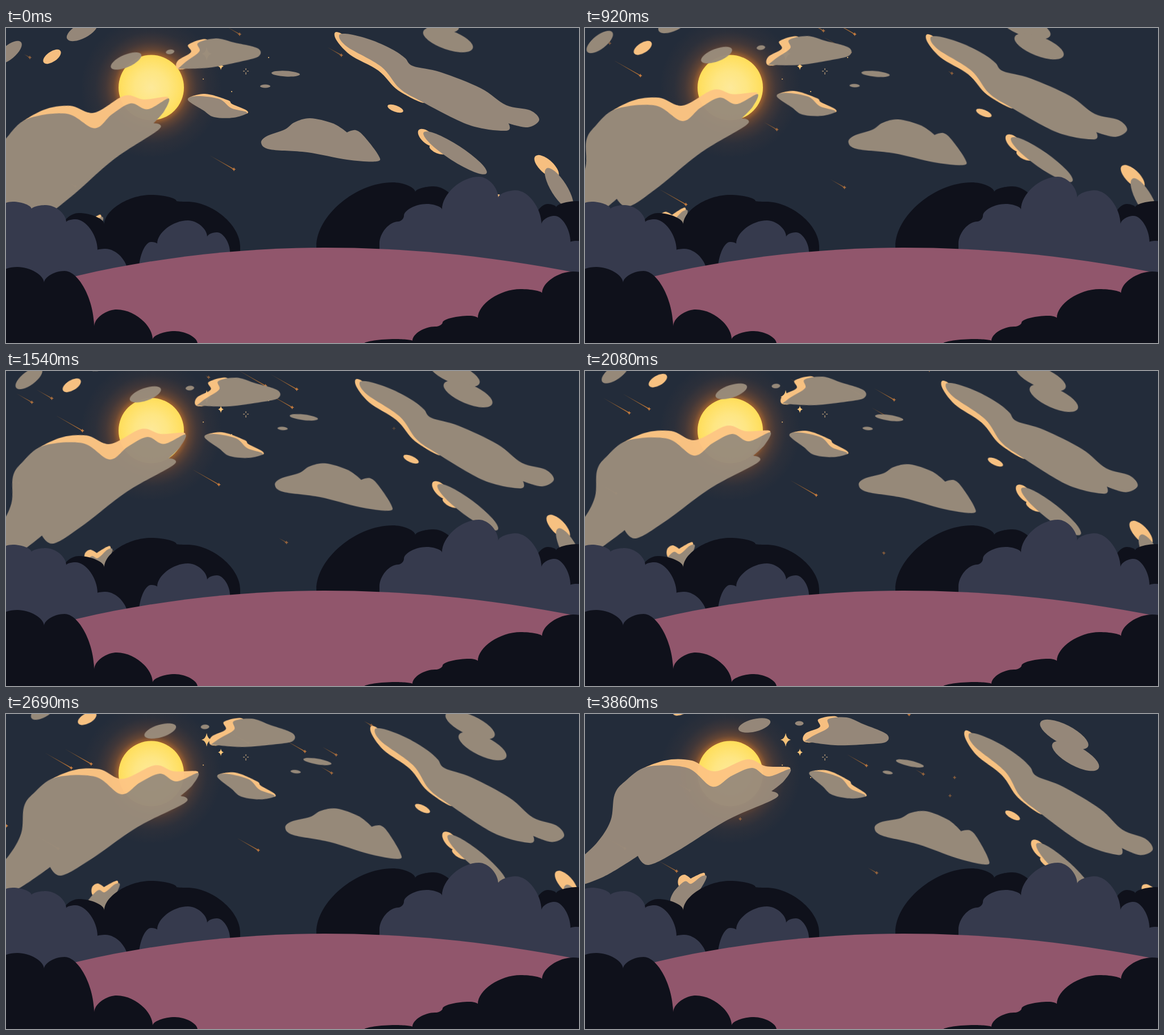
An HTML page for the animation above (3930 ms loop, 1008 by 555 pixels).

```html
<!DOCTYPE html>
<html lang="en">
<head>
<meta charset="utf-8">
<title>Night sky</title>
<style>
html, body { margin: 0; width: 100%; height: 100%; overflow: hidden; background: #232c3a; }
svg { display: block; width: 100%; height: 100%; }
</style>
</head>
<body>
<svg viewBox="0 0 1008 555" preserveAspectRatio="none">
  <defs>
    <radialGradient id="sunFill">
      <stop offset="0" stop-color="#fde99a"/>
      <stop offset=".5" stop-color="#fee683"/>
      <stop offset="1" stop-color="#ffde5a"/>
    </radialGradient>
    <radialGradient id="glow">
      <stop offset=".46" stop-color="#c8742d" stop-opacity=".75"/>
      <stop offset=".54" stop-color="#a8602f" stop-opacity=".48"/>
      <stop offset=".65" stop-color="#8a5233" stop-opacity=".29"/>
      <stop offset=".8" stop-color="#704a38" stop-opacity=".11"/>
      <stop offset="1" stop-color="#704a38" stop-opacity="0"/>
    </radialGradient>
    <linearGradient id="trail">
      <stop offset="0" stop-color="#b06c2c" stop-opacity=".15"/>
      <stop offset=".4" stop-color="#b06c2c" stop-opacity=".7"/>
      <stop offset="1" stop-color="#d08038"/>
    </linearGradient>
  </defs>
  <rect width="1008" height="555" fill="#232c3a"/>
  <g id="stars" fill="#fbc77b"></g>
  <circle cx="255.500" cy="105" r="124" fill="url(#glow)"/>
  <circle cx="255.500" cy="105" r="57.500" fill="url(#sunFill)"/>
  <g id="meteors"></g>
  <g id="clouds"></g>
  <g id="land"></g>
</svg>
<script>
const LOOP = 3930, STEP = 77.06, LAST = 50;
const TURN = 0.1844, PIVOT = '491 577';
const GREY = '#998b7b', PEACH = '#fdc583', BLACK = '#0f111b', INDIGO = '#363a4d', PINK = '#91566c';
const $ = id => document.getElementById(id);
const clamp = v => Math.max(0, Math.min(1, v));
const points = text => text.trim().split(/\s+/).map(s => {
  const [x, y] = s.split(',').map(parseFloat);
  return { x, y, sharp: s.endsWith('!') };
});

// Smooth closed outline through a few points; "!" marks a sharp corner.
function blob(fill, text) {
  const p = points(text), n = p.length, at = i => p[(i + n) % n];
  const handle = (i, sign) => {
    const a = at(i - 1), b = at(i), c = at(i + 1), k = b.sharp ? 0 : sign / 6;
    return `${b.x + (c.x - a.x) * k} ${b.y + (c.y - a.y) * k}`;
  };
  const curves = p.map((_, i) => `C${handle(i, 1)} ${handle(i + 1, -1)} ${at(i + 1).x} ${at(i + 1).y}`);
  return `<path fill="${fill}" d="M${p[0].x} ${p[0].y}${curves.join('')}Z"/>`;
}

// Round lobes: points alternate between a notch and the top of a lobe.
function bush(fill, base, text) {
  const p = points(text), k = .48;
  let d = `M${p[0].x} ${base}V${p[0].y}`;
  for (let i = 1; i < p.length; i++) {
    const a = p[i - 1], b = p[i], dx = (b.x - a.x) * k, dy = (b.y - a.y) * k;
    d += i % 2
      ? `C${a.x} ${a.y + dy} ${b.x - dx} ${b.y} ${b.x} ${b.y}`
      : `C${a.x + dx} ${a.y} ${b.x} ${b.y - dy} ${b.x} ${b.y}`;
  }
  return `<path fill="${fill}" d="${d}V${base}Z"/>`;
}
const oval = (fill, x, y, rx, ry, tilt = 0) =>
  `<ellipse fill="${fill}" rx="${rx}" ry="${ry}" transform="translate(${x} ${y}) rotate(${tilt})"/>`;
const star = (x, y, w, h) =>
  `<path transform="translate(${x} ${y})" d="M0 ${-h}Q${w * .18} ${-h * .12} ${w} 0Q${w * .18} ${h * .12} 0 ${h}Q${-w * .18} ${h * .12} ${-w} 0Q${-w * .18} ${-h * .12} 0 ${-h}Z"/>`;
const dot = (x, y) => `<circle cx="${x}" cy="${y}" r="1"/>`;

$('stars').innerHTML =
  star(353, 45.5, 9, 12) + star(378, 67.5, 5, 6.5) + dot(347, 90) + dot(397, 112) + dot(462, 52) +
  '<path d="M422 71v3M422 78v4M417 76h3M424 76h3" stroke="#d8b486" stroke-width="1.1"/>';

// The whole sky turns about one pivot; the left part is drawn in its final pose.
const lateSky =
  blob(PEACH, '90,104 140,82 188,82 228,101 285,80 318,92 361,95 330,115 225,145 130,115') +
  blob(GREY, `-30,305 -25,272 20,228 45,188 52,142 70,119 110,93 180,95 224,128 258,109 294,95 322,110
    361,97 350,118 328,136! 336,148 250,187 165,240 112,266 93,250! 30,288`) +
  blob(PEACH, '384,47 388,34 413,23 411,9 445,6 440,40 400,50') +
  blob(GREY, '386,48! 402,38 428,24 428,9 460,6 490,18 530,35 530,49 500,53 440,55') +
  oval(GREY, 298, 20, 29, 11, -14) + oval(GREY, 377, 16.5, 7.5, 4) +
  blob(PEACH, '165,303 165,289 175,283 186,290! 210,280 205,300 180,320') +
  blob(GREY, '151,335 155,315 175,295 187,299 205,286 214,287 202,310 172,350') +
  oval(GREY, 843, 36, 47, 17, 27) + oval(GREY, 863, 74, 46, 17, 28);

const earlySky =
  oval(PEACH, 81, 50.5, 18, 9, -35) + oval(GREY, 134, 5, 30, 13, -28) + oval(GREY, 5, 43, 28, 12, -40) +
  blob(PEACH, '320,125 350,116 390,127 398,134 423,145 423,151 400,150 350,135') +
  blob(GREY, '320,127 335,120 375,125 396,141 424,149 400,158 366,157 347,145') +
  oval(GREY, 492, 80.5, 25, 5, 3) + oval(GREY, 456, 102.5, 9, 3) +
  blob(GREY, `449,203 458,191 490,179 508,166 535,159 575,168 600,184! 615,180 630,191 655,224 652,235 600,232
    530,219 465,214`) +
  blob(PEACH, '579,17 590,10 660,62 735,130 690,110 655,75 605,47') +
  blob(GREY, `586,13 605,11 645,22 682,39 702,53 716,67 765,78 835,106 880,136 922,145 938,162 918,175
    884,168! 880,181 815,171 730,129 692,106 660,68 600,33`) +
  oval(PEACH, 685, 142, 14.5, 5.5, 20) +
  oval(PEACH, 741, 193, 20, 10, 42) + oval(PEACH, 760, 214, 16, 7, 22) + oval(GREY, 790, 220, 66, 14, 33) +
  oval(PEACH, 951, 244, 27, 12, 42) + oval(GREY, 973, 283, 42, 14, 58) + oval(PEACH, 865, 296, 6, 3);

$('clouds').innerHTML = `<g opacity=".97">${lateSky}</g><g opacity=".97">${earlySky}</g>`;
const [lateClouds, earlyClouds] = $('clouds').children;

$('land').innerHTML =
  bush(BLACK, 440, '100,350 128,326 173,346 255,294 300,305 318,306 412,385') +
  bush(BLACK, 400, '546,385 680,272 720,289 752,279 800,330') +
  bush(BLACK, 400, '930,340 953,310 968,316 1005,305 1040,330') +
  bush(INDIGO, 470, '-30,340 12,306 45,319 70,312 106,342 122,337 161,391 175,389 214,430') +
  bush(INDIGO, 430, '234,425 255,377 266,380 320,339 354,368 371,360 394,395') +
  bush(INDIGO, 450, '657,380 690,341 700,331 740,310 767,320 832,262 866,299 897,286 942,346 965,331 993,377 1003,375 1040,385') +
  `<path fill="${PINK}" d="M-10 470L128 436C270 403 420 387 560 387C720 387 860 404 1008 432V555H-10Z"/>` +
  bush(BLACK, 570, '-30,450 20,421 67,449 103,428 155,526 195,496 258,549 297,534 337,556') +
  bush(BLACK, 570, '630,556 685,548 715,551 755,526 768,519 815,507 830,511 905,460 943,467 998,429 1040,450');

// Start place and the second at which the trail is fully grown; all share one course.
const VX = 60, VY = 34.5, COURSE = Math.atan2(VY, VX) * 180 / Math.PI;
const meteors = [
  [42, 52, .85], [411, 11, .6], [590, 48, -1.9], [282, 147, 1.5], [401, 249, -.9],
  [122, 279, .8], [-47, 2, 2], [-12, -5, 2], [419, -21, .8], [364, -27, 1.4],
  [264, -42, 2.5], [481, -73, .2], [-161, 104, 2.5], [-70, 144, 2.4], [339, -132, 4]
];
$('meteors').innerHTML = meteors.map(() =>
  `<g><path d="M-1 -.2L0 -.8V.8L-1 .2Z" fill="url(#trail)"/><g fill="#d98640">${star(0, 0, 3.4, 3.4)}</g></g>`
).join('');
const streaks = [...$('meteors').children];

function pose(k) {
  const t = k * STEP / 1000;
  lateClouds.setAttribute('transform', `rotate(${(k - LAST) * TURN} ${PIVOT})`);
  earlyClouds.setAttribute('transform', `rotate(${k * TURN} ${PIVOT})`);
  streaks.forEach((g, i) => {
    const [x, y, peak] = meteors[i], age = t - peak;
    const grown = clamp(Math.min((age + 1.1) / 1.1, (3.2 - age) / 2.5));
    const seen = clamp((age + 1.3) * 4) * clamp((3.7 - age) * 2);
    g.setAttribute('transform', `translate(${x + VX * t} ${y + VY * t})`);
    g.firstChild.setAttribute('transform', `rotate(${COURSE}) scale(${52 * grown + .01} 1)`);
    g.setAttribute('opacity', seen * (.5 + .4 * grown));
  });
}

let start = null, shown = -1;
function draw(now) {
  if (start === null) start = now;
  const t = (now - start) % LOOP;
  const k = Math.min(LAST, Math.floor((t + 20) / STEP));
  if (k !== shown) pose(shown = k);
  requestAnimationFrame(draw);
}
pose(0);
requestAnimationFrame(draw);
</script>
</body>
</html>
```
